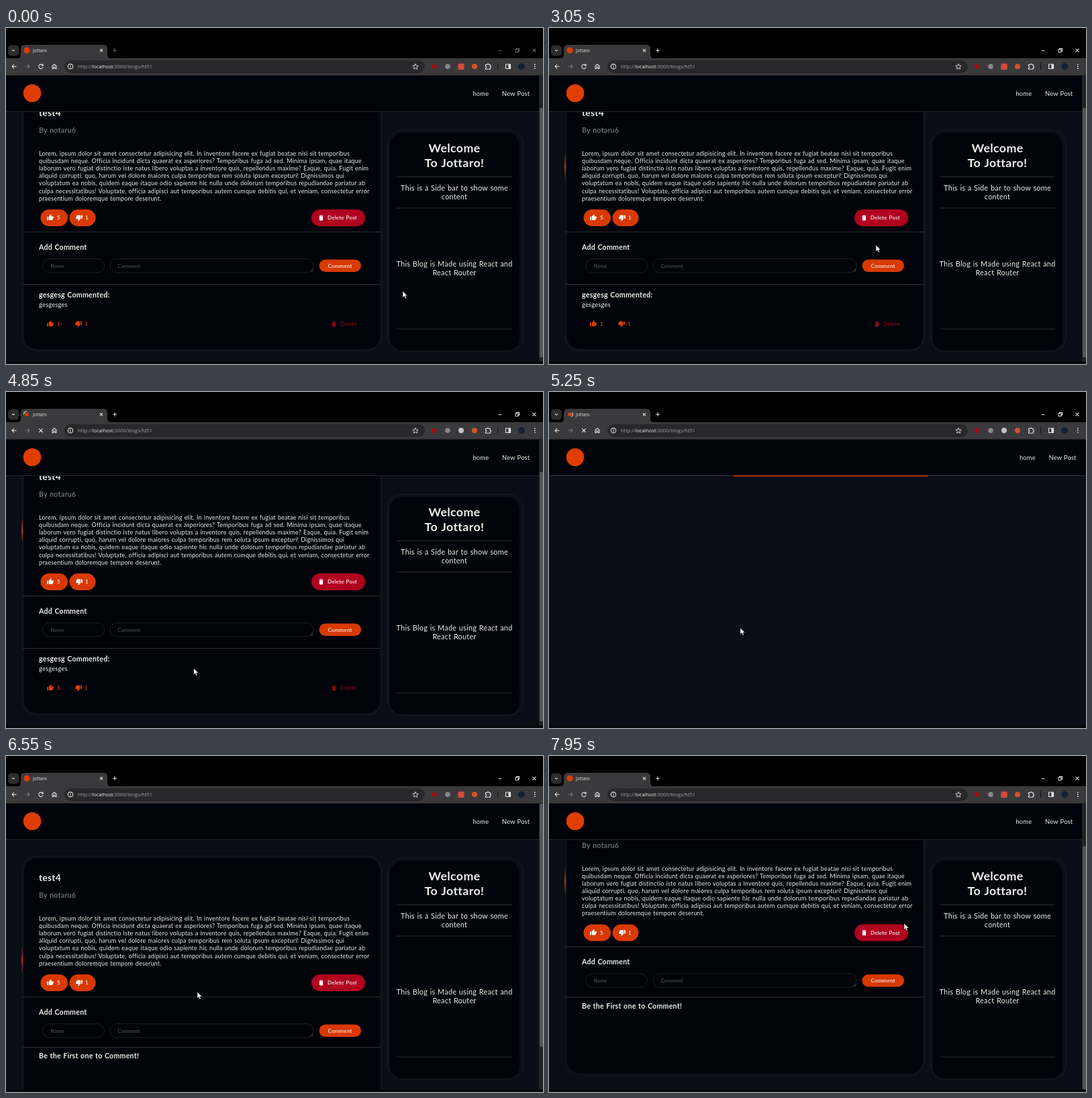
Recreate the animation shown at these times as an HTML page. Size 800 px wide and 500 px high, loop 8000 ms.

```html
<!DOCTYPE html>
<html lang="en">
<head>
<meta charset="utf-8">
<title>Blog post</title>
<style>
  html, body { margin: 0; width: 100%; height: 100%; overflow: hidden; background: #000; }
  svg { display: block; }
  .page text { font: 9px Lato, sans-serif; letter-spacing: .02em; word-spacing: .06em; fill: #eee; }
  .page .title { font-size: 13.8px; font-weight: 700; }
  .page .head { font-size: 10.67px; font-weight: 700; }
  .page .by { fill: #6b6c70; }
  .page .button { font-size: 8.1px; font-weight: 600; }
  .page .hint { font-size: 7.5px; fill: #55575c; }
  .page .nav { font-size: 9.3px; }
  .page .welcome { font-size: 17.8px; font-weight: 700; text-anchor: middle; }
  .page .side { font-size: 10.9px; text-anchor: middle; }
  .page .orange { fill: #e03d00; }
  .page .red { fill: #8c0715; }
  .chrome text { font: 7.4px "Open Sans", "Noto Sans", sans-serif; fill: #a0a0a2; }
  .chrome .tab { font-size: 6.7px; fill: #e8e8e8; }
  .icon { fill: none; stroke: #e4e4e4; stroke-width: 1.1; }
  .rule { stroke: #2a2d34; }
  .field { fill: none; stroke: #1a1d24; }
  .ring { fill: #0b0e16; stroke: #1a1d25; }
</style>
</head>
<body>
<svg width="800" height="500" viewBox="0 0 800 500">
  <defs>
    <clipPath id="view"><rect y="125" width="800" height="371"/></clipPath>
    <linearGradient id="shine" x2="0" y2="1">
      <stop stop-color="#e03d00" stop-opacity="0"/>
      <stop offset=".5" stop-color="#e03d00"/>
      <stop offset="1" stop-color="#e03d00" stop-opacity="0"/>
    </linearGradient>
    <path id="thumb" transform="scale(.44) translate(-12 -12)" d="M1 21h4V9H1zM23 10c0-1.1-.9-2-2-2h-6.3l1-4.6c.1-.5-.1-1-.4-1.4L14.2 1 7.6 7.6C7.2 8 7 8.500 7 9v10c0 1.100.9 2 2 2h9c.8 0 1.500-.5 1.800-1.200l3-7c.1-.3.2-.5.2-.8z"/>
    <path id="bin" transform="scale(.44) translate(-12 -12)" d="M6 19c0 1.100.9 2 2 2h8c1.100 0 2-.9 2-2V7H6zM19 4h-3.500l-1-1h-5l-1 1H5v2h14z"/>
  </defs>

  <g class="page">
    <rect y="70" width="800" height="426" fill="#0b0e16"/>
    <rect y="496" width="800" height="4" fill="#06070c"/>

    <g id="content">
      <g clip-path="url(#view)">
        <g id="scroller">
          <rect id="outer" class="ring" x="24.500" y="94" width="535" rx="22"/>
          <rect id="inner" x="27" y="97" width="530" rx="19" fill="#01030a"/>
          <rect id="glow" x="23.300" width="1.700" height="38" fill="url(#shine)"/>
          <text class="title" x="49" y="131.300">test4</text>
          <text class="head by" x="49" y="156.300">By notaru6</text>
          <text id="body" y="190"></text>

          <g fill="#d93900">
            <rect x="51.500" y="270" width="40.500" height="25" rx="12.500"/>
            <rect x="94.500" y="270" width="39" height="25" rx="12.500"/>
            <rect x="466.500" y="344.500" width="62.500" height="18.500" rx="9.250"/>
          </g>
          <rect x="455" y="270" width="80" height="25" rx="12.500" fill="#b0021f"/>
          <g fill="#fff">
            <use href="#thumb" x="66" y="282"/>
            <use href="#thumb" transform="translate(109 282.500) rotate(180)"/>
            <use href="#bin" x="469.500" y="282.500"/>
          </g>
          <text class="button" x="76" y="285.300">5</text>
          <text class="button" x="118" y="285.300">1</text>
          <text class="button" x="479" y="285.300">Delete Post</text>
          <path class="rule" d="M24 303.500H559"/>

          <text class="head" x="49" y="329.500">Add Comment</text>
          <g id="form">
            <rect class="field" x="54.500" y="343.500" width="92" height="20.500" rx="10.250"/>
            <rect class="field" x="155" y="343.500" width="303" height="20.500" rx="10.250"/>
            <path d="M453.500 362.500l4-4M456 362.500l1.500-1.500" stroke="#777" stroke-width=".7"/>
            <text class="hint" x="66.500" y="356.500">Name</text>
            <text class="hint" x="166.500" y="356.500">Comment</text>
          </g>
          <text class="button" x="479.500" y="356.500">Comment</text>
          <path id="split" class="rule" d="M24 0H559"/>

          <g id="comment">
            <text class="head" x="49" y="400.500">gesgesg Commented:</text>
            <text x="49" y="415" style="font-size:9.300px">gesgesges</text>
            <g class="orange">
              <use href="#thumb" x="66" y="440"/>
              <use href="#thumb" transform="translate(108 440.500) rotate(180)"/>
            </g>
            <text class="button orange" x="76" y="443.300">1</text>
            <text class="button orange" x="117" y="443.300">1</text>
            <use class="red" href="#bin" x="488.500" y="440.500" fill="#a80a1c"/>
            <text class="button red" x="498" y="443.300">Delete</text>
          </g>
          <text id="empty" class="head" x="49" y="395.300">Be the First one to Comment!</text>
        </g>
      </g>

      <rect class="ring" x="568.500" y="152.500" width="202" height="328" rx="21"/>
      <rect x="572" y="156.500" width="193" height="323.500" rx="18" fill="#01030a"/>
      <path class="rule" d="M582 221.500H754M582 268H754M582 448H754"/>
      <text class="welcome" x="668" y="185">Welcome</text>
      <text class="welcome" x="668" y="207.300">To Jottaro!</text>
      <text class="side" x="668" y="242">This is a Side bar to show some</text>
      <text class="side" x="668" y="255.300">content</text>
      <text class="side" x="668" y="355">This Blog is Made using React and</text>
      <text class="side" x="668" y="368.300">React Router</text>
    </g>

    <rect y="70" width="800" height="54" fill="#01030a"/>
    <path id="navLine" stroke="#22262e" d="M0 124.500H800"/>
    <g id="loader" fill="#c93a06">
      <rect y="124" width="290" height="1.700"/>
      <rect x="-800" y="124" width="290" height="1.700"/>
    </g>
    <circle cx="39" cy="97" r="13.300" fill="#e03d00"/>
    <g id="links">
      <text class="nav" x="695.500" y="100.500">home</text>
      <text class="nav" x="739" y="100.500">New Post</text>
    </g>
    <g id="scrollbar">
      <rect x="794" y="71" width="6" height="425" fill="#222326"/>
      <rect id="grip" x="795" width="5" rx="1" fill="#55565a"/>
    </g>
  </g>

  <g class="chrome">
    <rect width="800" height="45" fill="#000"/>
    <rect y="45" width="800" height="25.500" fill="#3a3a3c"/>
    <rect x="3" y="25.500" width="16" height="16" rx="5" fill="#2b2b2d"/>
    <path class="icon" d="M9 32.300l2 2 2-2"/>
    <path d="M17 45q5 0 5-5v-9q0-6 6-6h117q6 0 6 6v9q0 5 5 5z" fill="#3a3a3c"/>
    <circle id="favicon" cx="31" cy="33.300" fill="#e03d00"/>
    <path id="spinner" class="icon" d="M0-4.500A4.500 4.500 0 0 0-4.500 0"/>
    <text class="tab" x="40" y="35.800">Jottaro</text>
    <path class="icon" d="M140 31.300l4 4m0-4l-4 4"/>
    <path id="windowKeys" class="icon" d="M159 33.300h6m-3-3v6M733.500 33.800h5M759 32h4v4h-4zM760.500 32v-1.500h4v4h-1.500M784.500 30.800l5 5m0-5l-5 5"/>

    <path class="icon" d="M15.500 57.300h-6.500m3-3l-3 3 3 3"/>
    <path class="icon" style="stroke:#77787a" d="M28.500 57.300h6.500m-3-3l3 3-3 3"/>
    <path id="reload" class="icon" d="M54.500 55.300A3.200 3.200 0 1 0 55.200 58M55.200 53.500v2.500h-2.500"/>
    <path id="stop" class="icon" d="M49.300 54.600l5.400 5.400m0-5.400l-5.400 5.400"/>
    <path class="icon" d="M69 60.500v-4l3-2.500 3 2.500v4h-2v-2.500h-2v2.500z"/>
    <rect x="87" y="48" width="537" height="19" rx="9.500" fill="#28282a"/>
    <circle class="icon" cx="96" cy="57.300" r="3.700"/>
    <path class="icon" d="M96 56.800v2.700M96 55v.9"/>
    <text x="107" y="60">http://<tspan fill="#eee">localhost</tspan>:3000/blogs/fd51</text>
    <path class="icon" style="stroke-width:.9" d="M610 53.300l1.200 2.700 3 .3-2.300 2 .7 2.900-2.600-1.500-2.600 1.500.7-2.900-2.300-2 3-.3z"/>
    <circle cx="637.500" cy="57.300" r="3.800" fill="#9a1018"/>
    <circle cx="658" cy="57.300" r="3.800" fill="#8a8598"/>
    <rect id="badge" x="673.500" y="53" width="9" height="9" fill="#d9483c"/>
    <circle id="badgeIdle" cx="678" cy="57.300" r="4" fill="#c4c4c6"/>
    <circle cx="698" cy="57.300" r="4" fill="#d8522c"/>
    <path class="icon" d="M714.500 54.500h2.200a1.200 1.200 0 0 1 2.400 0h2.200v2.200a1.200 1.200 0 0 1 0 2.400v2.200h-6.800v-2a1.300 1.300 0 0 0 0-2.600z"/>
    <path stroke="#151517" d="M732.500 52v10"/>
    <path class="icon" d="M744.500 54h7v6.500h-7z"/>
    <path fill="#e4e4e4" d="M748.500 54h3v6.500h-3z"/>
    <circle cx="768" cy="57.300" r="5" fill="#172030"/>
    <path fill="#e4e4e4" d="M787 53.500h1.600v1.600H787zM787 56.500h1.600v1.600H787zM787 59.500h1.600v1.600H787z"/>
  </g>

  <path id="cursor" fill="#fff" stroke="#000" stroke-width=".5" d="M0 0V9.600L2.200 7.600 3.700 11 5.300 10.300 3.900 7H6.900Z"/>
</svg>

<script>
  const LOOP = 8000;
  const LOAD = [4300, 5500];
  const BLANK = [5000, 6200];
  // time, x, y of the pointer; it rests where two stops agree
  const PATH = [
    [50, 591, 391.5], [300, 597, 434], [850, 597, 434], [1350, 600, 510],
    [2050, 783, 478], [2850, 500, 330], [3050, 487, 323], [3450, 503, 445],
    [3600, 503, 445], [4400, 279.500, 411], [4850, 279.500, 411],
    [5250, 285, 351], [7550, 285, 351], [7950, 529, 249]
  ];
  const LINES = [
    'Lorem, ipsum dolor sit amet consectetur adipisicing elit. In inventore facere ex fugiat beatae nisi sit temporibus',
    'quibusdam neque. Officia incidunt dicta quaerat ex asperiores? Temporibus fuga ad sed. Minima ipsam, quae itaque',
    'laborum vero fugiat distinctio iste natus libero voluptas a inventore quis, repellendus maxime? Eaque, quia. Fugit enim',
    'aliquid corrupti, quo, harum vel dolore maiores culpa temporibus rem soluta ipsum excepturi! Dignissimos qui',
    'voluptatum ea nobis, quidem eaque itaque odio sapiente hic nulla unde dolorum temporibus repudiandae pariatur ab',
    'culpa necessitatibus! Voluptate, officia adipisci aut temporibus autem cumque debitis qui, et veniam, consectetur error',
    'praesentium doloremque tempore deserunt.'
  ];

  const $ = id => document.getElementById(id);
  const set = (id, attrs) => {
    for (const name in attrs) $(id).setAttribute(name, attrs[name]);
  };
  const show = (id, on) => { $(id).style.display = on ? '' : 'none'; };
  const move = (id, x, y, turn = 0) =>
    set(id, { transform: `translate(${x} ${y}) rotate(${turn})` });
  const progress = (t, from, to) => Math.min(1, Math.max(0, (t - from) / (to - from)));
  const smooth = u => u * u * (3 - 2 * u);
  const within = (t, [from, to]) => t >= from && t < to;

  $('body').innerHTML = LINES.map((line, i) =>
    `<tspan x="49" dy="${i ? 11.1 : 0}">${line}</tspan>`).join('');

  function pointer(t) {
    const next = PATH.findIndex(stop => stop[0] > t);
    if (next === 0) return PATH[0].slice(1);
    if (next < 0) return PATH[PATH.length - 1].slice(1);
    const [t0, x0, y0] = PATH[next - 1];
    const [t1, x1, y1] = PATH[next];
    const u = smooth(progress(t, t0, t1));
    return [x0 + (x1 - x0) * u, y0 + (y1 - y0) * u];
  }

  function drawGlow(t, start) {
    const u = progress(t, start, start + 850);
    set('glow', { y: 187 + 124 * (1 - u) ** 2, opacity: Math.min(1, u * 4) });
  }

  function drawPage(t) {
    const blank = within(t, BLANK);
    const fresh = t >= BLANK[1];
    const scroll = fresh ? 74.5 * smooth(progress(t, 6580, 6950)) : 55;

    for (const id of ['content', 'scrollbar']) show(id, !blank);
    show('loader', blank);
    show('comment', !fresh);
    show('empty', fresh);
    move('links', blank ? 5.5 : 0, 0);
    set('navLine', { stroke: blank ? '#30343b' : '#22262e' });
    move('loader', (794 + (t - 5900) * .8 + 1600) % 800, 0);

    move('scroller', 0, 55 - scroll);
    const height = fresh ? 400.5 : 386.5;
    set('outer', { height });
    set('inner', { height: height - 6 });
    move('split', 0, fresh ? 378.5 : 381.5);
    drawGlow(t, fresh ? BLANK[1] : 2200);

    const total = fresh ? 499.5 : 487;
    set('grip', { y: 71 + scroll * 425 / total, height: 425 * 425 / total });
  }

  function drawChrome(t) {
    const loading = within(t, LOAD);
    const idle = within(t, [LOAD[0], 5300]);
    show('stop', loading);
    show('reload', !loading);
    show('spinner', loading);
    show('badge', !idle);
    show('badgeIdle', idle);
    set('favicon', { r: loading ? 2.8 : 4.6 });
    move('spinner', 31, 33.3, (t - 4850) * .36);
    set('windowKeys', { opacity: .45 + .55 * progress(t, 0, 300) });
  }

  function frame(now) {
    const t = now % LOOP;
    drawPage(t);
    drawChrome(t);
    show('cursor', !within(t, [1350, 2100]));
    move('cursor', ...pointer(t));
    requestAnimationFrame(frame);
  }
  requestAnimationFrame(frame);
</script>
</body>
</html>
```
